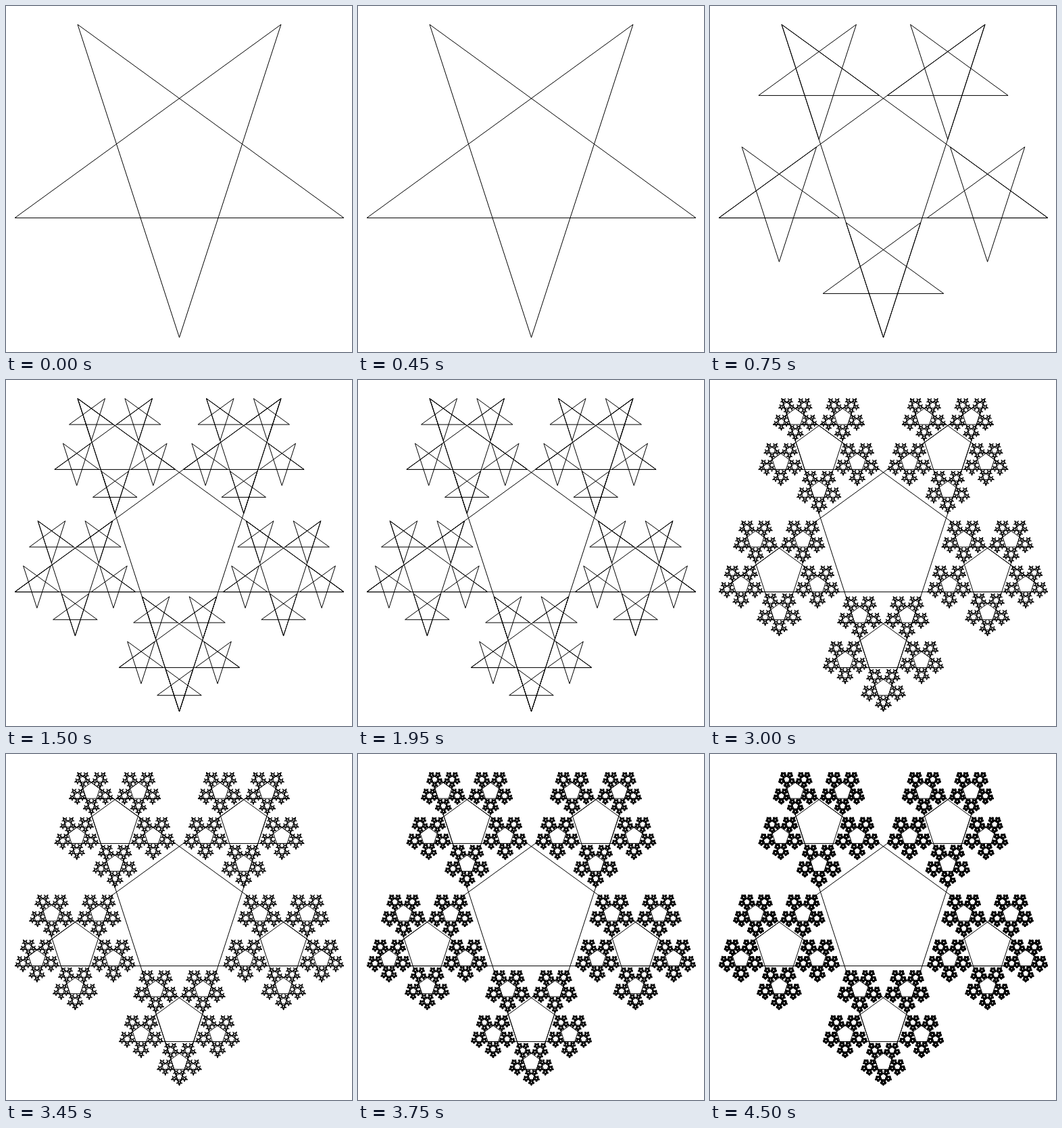
An HTML page with a canvas for the animation above (5250 ms loop, 512x512 px).

```html
<!DOCTYPE html>
<html lang="en">
<head>
<meta charset="utf-8">
<title>Pentagram fractal</title>
<style>
  html, body { margin: 0; width: 100%; height: 100%; overflow: hidden; background: #fff; }
  canvas { display: block; width: 512px; height: 512px; }
</style>
</head>
<body>
<canvas id="stage" width="512" height="512"></canvas>
<script>
const ctx = document.getElementById('stage').getContext('2d');
const STEP = 750, LEVELS = 7;
const RADIUS = 256, RATIO = 0.367;

// Unit star points in stroke order, first one pointing down.
const tips = Array.from({ length: 5 }, (_, i) => {
  const a = Math.PI / 2 + i * Math.PI * 0.8;
  return [Math.cos(a), Math.sin(a)];
});

function star(x, y, r) {
  ctx.beginPath();
  tips.forEach(([dx, dy], i) => {
    const [ex, ey] = tips[(i + 1) % 5];
    ctx.moveTo(x + r * dx, y + r * dy);
    ctx.lineTo(x + r * ex, y + r * ey);
  });
  ctx.stroke();
}

// Each smaller star shares a tip with its parent.
function fractal(x, y, r, depth) {
  star(x, y, r);
  if (!depth) return;
  const d = r * (1 - RATIO);
  for (const [dx, dy] of tips) fractal(x + d * dx, y + d * dy, r * RATIO, depth - 1);
}

function draw(level) {
  ctx.fillStyle = '#fff';
  ctx.fillRect(0, 0, 512, 512);
  ctx.strokeStyle = '#000';
  ctx.lineWidth = 1;
  fractal(256.5, 234.5, RADIUS, level);
}

let shown = -1;
function tick() {
  const level = Math.floor(performance.now() / STEP) % LEVELS;
  if (level !== shown) draw(shown = level);
  requestAnimationFrame(tick);
}
tick();
</script>
</body>
</html>
```
